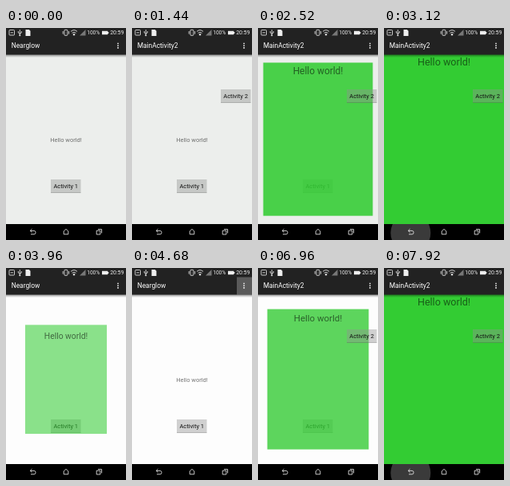
Write an HTML page that moves like this. It is 150 px wide and 266 px high and loops after 8000 ms.

```html
<!DOCTYPE html>
<html lang="en">
<head>
<meta charset="utf-8">
<title>Activity transition</title>
<style>
html, body { margin: 0; width: 100%; height: 100%; overflow: hidden; background: #000; }
svg { display: block; width: 100vw; height: 100vh; }
text { font: 7.5px Roboto, "Liberation Sans", sans-serif; }
.mid { text-anchor: middle; }
.line { fill: none; stroke: #ddd; stroke-width: .9; }
</style>
</head>
<body>
<svg viewBox="0 0 150 266">
  <defs>
    <linearGradient id="shade" x2="0" y2="1">
      <stop stop-opacity=".45"/><stop offset="1" stop-opacity="0"/>
    </linearGradient>
    <clipPath id="nav"><rect y="246" width="150" height="20"/></clipPath>
  </defs>

  <rect id="page" width="150" height="266"/>
  <g>
    <rect x="56" y="190" width="37.5" height="17" fill="#919191" fill-opacity=".42"/>
    <path d="M56 206.6h37.5" stroke="#000" stroke-opacity=".2" stroke-width=".8"/>
    <text class="mid" x="74.7" y="201" fill="#111">Activity 1</text>
  </g>
  <rect id="panel" fill="#33cc33"/>
  <text id="hello" class="mid" x="75" fill-opacity=".54">Hello world!</text>
  <g id="second">
    <rect x="111" y="77" width="37.5" height="17" fill="#919191" fill-opacity=".42"/>
    <path d="M111 93.6h37.5" stroke="#000" stroke-opacity=".2" stroke-width=".8"/>
    <text class="mid" x="129.6" y="88.2" fill="#111">Activity 2</text>
  </g>

  <!-- action bar -->
  <rect y="33" width="150" height="4" fill="url(#shade)"/>
  <rect width="150" height="33.5" fill="#222"/>
  <rect id="press" x="131" y="11.5" width="19" height="22" fill="#fff"/>
  <text id="title" x="6.7" y="25" fill="#fff" style="font-size:8.4px"></text>
  <path d="M139.2 18.7h1.6v1.6h-1.6zm0 2.7h1.6v1.6h-1.6zm0 2.7h1.6v1.6h-1.6z" fill="#eee"/>

  <!-- status bar -->
  <rect class="line" x="4" y="2.5" width="6.5" height="6.5" rx=".8"/>
  <path class="line" d="M5.7 5.8h3.2M17.3 2v7.5M15.3 4v2l2 1.3 2-1.3v-2"/>
  <circle cx="17.3" cy="9.2" r="1" fill="#ddd"/>
  <path d="M24.5 2h4.3l1.7 1.7v6.3h-6z" fill="#eee"/>
  <rect class="line" x="73" y="2.3" width="3.8" height="7" rx=".6"/>
  <path class="line" d="M71.2 4v3.6M78.6 4v3.6M81 4.4q4-3.6 8 0M82.5 6.3q2.5-2 5 0"/>
  <circle cx="85" cy="8.3" r="1.2" fill="#ddd"/>
  <path d="M92 9.5l7.5-7.5v7.5z" fill="#777"/>
  <text x="101.2" y="8.4" fill="#eee" style="font-size:6.6px">100%</text>
  <path d="M120 3.7h7.3v1.2h1v2.2h-1v1.2h-7.3z" fill="#eee"/>
  <text x="130.2" y="8.4" fill="#eee" style="font-size:6.9px">20:59</text>

  <!-- navigation bar -->
  <rect y="246" width="150" height="20" fill="#000"/>
  <g clip-path="url(#nav)"><circle id="glow" cx="33.3" cy="257" r="25" fill="#3a3a3a"/></g>
  <path class="line" d="M32.5 252.2l-2.3 2.2 2.3 2.2M30.4 254.4h4.8q1.8 0 1.8 2.2t-1.8 2.2h-4.2M72.2 258.8v-3.8l2.8-2.6 2.8 2.6v3.8zM113.2 254.2h4.6v4.8h-4.6zM115 252.6h4.6v4.8"/>
</svg>
<script>
const LOOP = 8000, GROW = 1200;
const $ = id => document.getElementById(id);
const set = (id, attrs) => {
  for (const key in attrs) $(id).setAttribute(key, attrs[key]);
};
const ramp = (t, from, length) => Math.min(1, Math.max(0, (t - from) / length));
const ease = (t, from) => (1 - Math.cos(Math.PI * ramp(t, from, GROW))) / 2;
const fadeOut = (t, on, fade, length) => t < on ? 0 : 1 - ramp(t, fade, length);

function draw(t) {
  const p = ease(t, 1590) - ease(t, 3410) + ease(t, 6126);
  const inSecond = t >= 1440 && t < 3300 || t >= 5880;
  const menu = t < 4640 ? fadeOut(t, 120, 440, 240) : fadeOut(t, 4640, 5120, 240);
  const back = t < 7400 ? fadeOut(t, 3110, 3240, 240) : 1;

  set("page", { fill: t < 3000 ? "#eceeec" : "#fdfdfd" });
  set("panel", {
    x: 55 - 55 * p, y: 121 - 88 * p,
    width: 40 + 110 * p, height: 38 + 175 * p, "fill-opacity": p
  });
  set("hello", { y: 143 - 96.3 * p });
  $("hello").style.fontSize = 7.5 + 5 * p + "px";
  set("second", { visibility: inSecond ? "visible" : "hidden" });
  set("press", { opacity: .25 * menu });
  set("glow", { opacity: back });
  $("title").textContent = inSecond ? "MainActivity2" : "Nearglow";
}

function tick() {
  draw(performance.now() % LOOP);
  requestAnimationFrame(tick);
}
tick();
</script>
</body>
</html>
```
